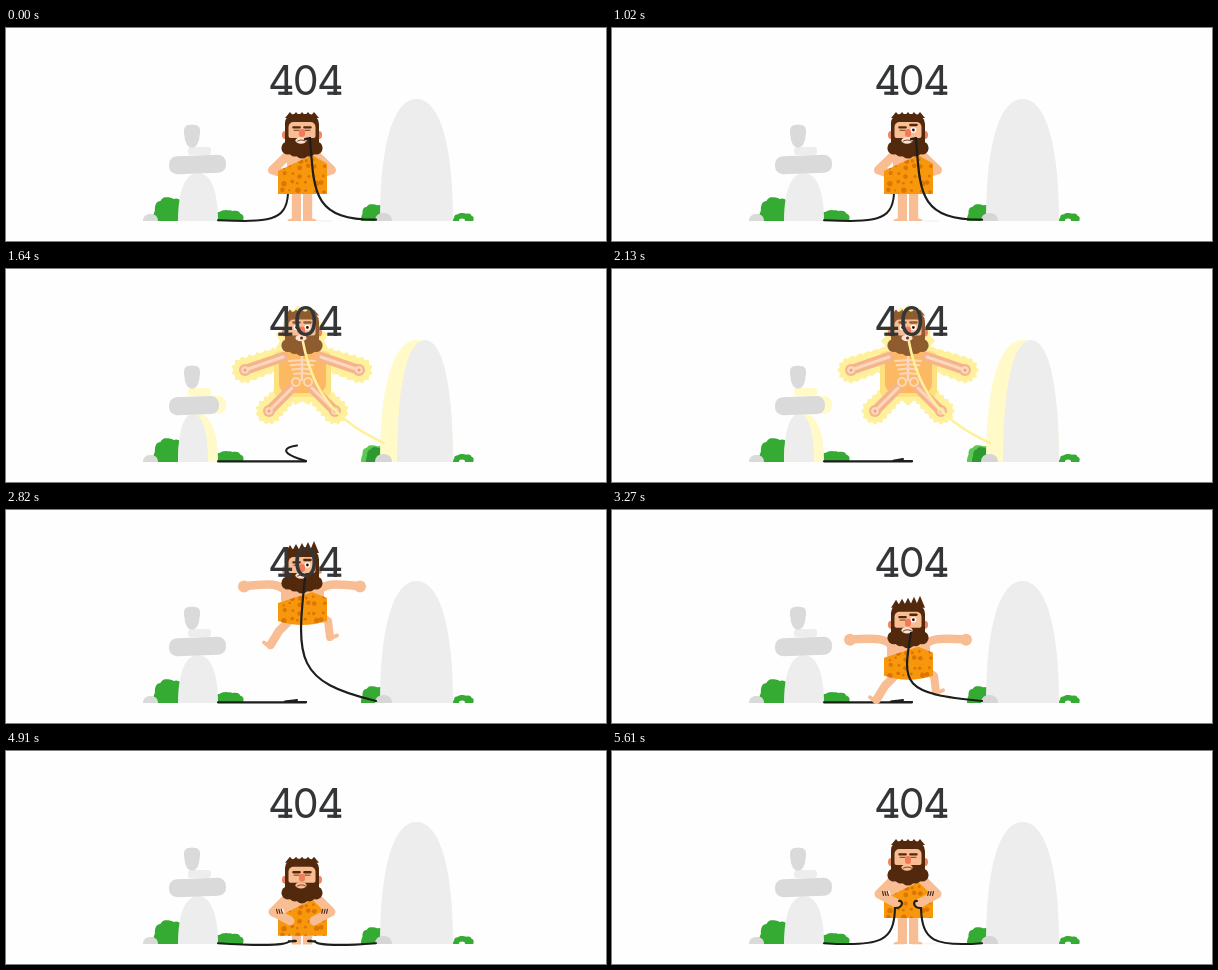
Write an HTML page with a canvas that moves like this. It is 600x213 px and loops after 5.72 s.

```html
<!DOCTYPE html>
<html lang="en">
<head>
<meta charset="utf-8">
<title>404</title>
<style>
html, body { margin: 0; width: 100%; height: 100%; overflow: hidden; background: #fefefe; }
canvas { display: block; width: 600px; height: 213px; }
</style>
</head>
<body>
<canvas id="stage"></canvas>
<script>
const W = 600, H = 213, LOOP = 5720, GROUND = 193, CX = 296;
const PAPER = '#fefefe', LIGHT = '#ededed', GREY = '#dadada', GREEN = '#36ab34';
const SKIN = '#f9bd94', HAIR = '#52290d', NOSE = '#f27a58', CLOTH = '#f7980c', SPOT = '#de7403';
const CORD = '#1d1d1b', GLOW = '#fff09b', LIT = '#fffac8', BONE = '#fbd8bd';
const SHOCK = 1130, DROP = 2680, LAND = 3390, SETTLED = 3780, STAND = 4740;

const canvas = document.getElementById('stage');
const ctx = canvas.getContext('2d');
const dpr = window.devicePixelRatio || 1;
canvas.width = W * dpr;
canvas.height = H * dpr;

const span = (t, a, b) => Math.max(0, Math.min(1, (t - a) / (b - a)));
const ease = k => k * k * (3 - 2 * k);
const mix = (a, b, k) => a + (b - a) * k;
function seeded(s) {
  return () => (s = s * 16807 % 2147483647) / 2147483647;
}

function oval(color, x, y, rx, ry = rx) {
  ctx.fillStyle = color;
  ctx.beginPath();
  ctx.ellipse(x, y, rx, ry, 0, 0, 7);
  ctx.fill();
}
function box(color, x, y, w, h, r = 0) {
  ctx.fillStyle = color;
  ctx.beginPath();
  ctx.roundRect(x, y, w, h, r);
  ctx.fill();
}
function limb(color, w, ...p) {
  ctx.strokeStyle = color;
  ctx.lineWidth = w;
  ctx.beginPath();
  for (let i = 0; i < p.length; i += 2) ctx.lineTo(p[i], p[i + 1]);
  ctx.stroke();
}
function curve(color, w, x, y, ...c) {
  ctx.strokeStyle = color;
  ctx.lineWidth = w;
  ctx.beginPath();
  ctx.moveTo(x, y);
  ctx.bezierCurveTo(...c);
  ctx.stroke();
}
// Closed shape from a radius rule
function radial(color, n, at) {
  ctx.fillStyle = color;
  ctx.beginPath();
  for (let i = 0; i < n; i++) ctx.lineTo(...at(i * 2 * Math.PI / n, i));
  ctx.fill();
}
function moved(x, y, draw) {
  ctx.save();
  ctx.translate(x, y);
  draw();
  ctx.restore();
}
// Draws both sides; x counts outward from the body axis
function bothSides(draw) {
  for (const s of [-1, 1]) moved(CX, 0, () => { ctx.scale(s, 1); draw(s); });
}

function dome(color, x0, x1, top) {
  const w = x1 - x0, k = GROUND - (GROUND - top) * 0.66;
  ctx.fillStyle = color;
  ctx.beginPath();
  ctx.moveTo(x0, GROUND);
  ctx.bezierCurveTo(x0, k, x0 + w * 0.2, top, x0 + w / 2, top);
  ctx.bezierCurveTo(x1 - w * 0.2, top, x1, k, x1, GROUND);
  ctx.fill();
}
function bush(color, x0, x1, h) {
  const r = (x1 - x0) / 2;
  radial(color, 90, a => {
    const q = 0.93 + 0.07 * Math.abs(Math.sin(a * 4.5));
    const flat = v => Math.sign(v) * Math.abs(v) ** 0.75;
    return [x0 + r + r * q * flat(Math.cos(a)), GROUND - h * q * Math.max(0, flat(Math.sin(a)))];
  });
}

function scenery(lit) {
  bush(GREEN, 147, 180, 24);
  bush(GREEN, 207, 238, 11);
  bush(lit ? '#5cc957' : GREEN, 355, 381, 17);
  if (lit) bush('#2d9a2f', 360, 381, 15);
  bush(GREEN, 447, 468, 8);
  oval(PAPER, 456, GROUND, 3, 2.4);
  dome(GREY, 137, 152, 186);

  box(lit ? LIT : LIGHT, 182, 119, 23, 8, 3);
  box(GREY, 178, 97, 16, 13, 5);
  oval(GREY, 186, 108, 7.5, 11.5);
  if (lit) dome(LIT, 172, 212, 145);
  dome(LIGHT, 172, lit ? 202 : 212, 145);
  moved(191.5, 136.5, () => {
    ctx.rotate(-0.035);
    if (lit) box(LIT, -28.5, -9, 57, 18, 8);
    box(GREY, -28.5, -9, lit ? 50 : 57, 18, 8);
  });

  if (lit) dome(LIT, 374, 447, 71);
  dome(LIGHT, lit ? 391 : 374, 447, 71);
  dome('#d6d6d6', 369, 386, 185);
  box(PAPER, 0, GROUND, W, 20);
}

function title() {
  ctx.fillStyle = '#333537';
  ctx.font = '400 41px Inter, Roboto, sans-serif';
  ctx.textAlign = 'center';
  [...'404'].forEach((c, i) => {
    const x = 275.3 + i * 24.5;
    ctx.fillText(c, x, 66.8);
    if (c === '4') ctx.fillRect(x - 3, 63.6, 14, 3.2);
  });
}

function eye(s, open, look, hair) {
  if (open) {
    oval('#fff', s * 5.4, -5, 3, 2.7);
    oval('#2a160c', s * 5.4 + look, -5, 1.4);
  } else {
    limb('#7b3c1d', 1, s * 2.8, -4.7, s * 8, -4.7);
  }
  const y = open ? -10 : -7.6;
  limb(hair, 2.3, s * 2.3, y, s * 8.6, y);
}

// Eyes counts the open ones
function head(y, { eyes = 0, mouth = 'frown', wild = 0, chew = 0, look = 0, hair = HAIR, skin = SKIN } = {}) {
  moved(CX, y, () => {
    for (const s of [-1, 1]) oval('#ec8663', s * 17, 0, 3, 4);
    box(hair, -17, -21, 34, 26, [9, 10, 3, 3]);
    for (let i = -2; i <= 2; i++) {
      const tip = -23 - wild * (4 + i);
      radial(hair, 3, (a, j) => [i * 6 + (j - 1) * 5, j === 1 ? tip : -17]);
    }
    moved(0, chew, () => {
      box(hair, -17, -2, 34, 17, 5);
      for (let i = -2; i <= 2; i++) oval(hair, i * 7, 17 - 2 * Math.abs(i), 6.6);
    });
    box(skin, -13.5, -13, 27, 16, [5, 5, 2, 2]);
    eye(-1, eyes > 1, look, hair);
    eye(1, eyes > 0, look, hair);
    moved(0, chew, () => {
      oval(mouth === 'frown' ? skin : '#fbe3d2', -1, 5.5, 5.6, 3.2);
      if (mouth === 'open') oval('#6b2d18', -0.5, 5.5, 1.5);
      else curve('#7b3c1d', 1, -5, 6.5, -3, 4.5, 2, 4.5, 4, 6.5);
    });
    box(NOSE, -3, -6, 6, 8, 3);
  });
}

function tunic(y, h, slant, r = 0) {
  const x = 272, w = 49, rnd = seeded(41);
  ctx.save();
  ctx.beginPath();
  ctx.moveTo(x, y + slant);
  ctx.lineTo(x + w * 0.7, y);
  ctx.lineTo(x + w, y + slant * 0.55);
  ctx.lineTo(x + w, y + h - r);
  ctx.quadraticCurveTo(x + w / 2, y + h + r, x, y + h - r);
  ctx.fillStyle = CLOTH;
  ctx.fill();
  ctx.clip();
  for (let dy = 3; dy < h; dy += 7.5)
    for (let dx = 3; dx < w; dx += 8)
      oval(SPOT, x + dx + rnd() * 4, y + dy + rnd() * 4, 1 + rnd() * 1.8);
  ctx.restore();
}

function legs() {
  box('#eeeeee', 282, 192.5, 44, 1);
  for (const s of [-1, 1]) {
    box(SKIN, CX + s * 5.6 - 4.6, 163, 9.2, 30);
    oval(SKIN, CX + s * 9.5, GROUND, 5, 2.5);
  }
  box(PAPER, 280, GROUND, 34, 4);
}

function tattoo(x, y) {
  for (let i = 0; i < 3; i++) limb('#4a2a16', 1.1, x - i * 2.4, y, x - 1 - i * 2.4, y + 4);
}

function biting(t) {
  const beat = t >= 30 && t < 800 ? Math.sin((t - 30) / 90) : 0;
  const bob = Math.abs(beat);
  curve(CORD, 2, 212, 192.3, 262, 194, 280, 194, 282, 166);
  legs();
  box(SKIN, 281, 121, 30, 30, 8);
  bothSides(() => limb(SKIN, 9, 14, 127, 29.5, 142, 20, 145));
  tunic(127, 39, 16);
  head(107 + bob * 0.6, { eyes: t >= 840 ? 1 : 0, mouth: 'bite', chew: bob * 1.2 });
  limb(CORD, 2.2, 299, 111, 304, 110);
  curve(CORD, 2.2, 304, 110, 308 + beat * 2, 165, 307 + beat * 2, 192, 370, 191.7);
}

function looseCord(t) {
  const k = t < 1640 ? 1 + (1640 - t) / 900 : 1 - ease(span(t, 1720, 2060));
  const w = Math.sin((t - 1640) / 70) * 2;
  limb(CORD, 2.2, 212, 192.3, 300, 192.3);
  curve(CORD, 2.1, 300, 192, 270 + w, mix(192, 183, k), 280 + w, mix(192, 178, k), 291, mix(190, 176.5, k));
}

function flying(t, dy) {
  const k = span(dy, 0, 94), swing = Math.sin(t / 110);
  const low = y => mix(y, 192, k);
  moved(0, dy, () => {
    limb(SKIN, 8.5, 282, 112, 273, 121, 264.5, 135);
    limb(SKIN, 4, 264, 137, 258, 132.5);
    limb(SKIN, 8, 315, 106, 322, 111, 324, 127);
    limb(SKIN, 4, 323, 129, 331, 125.5);
    box(SKIN, 275, 74, 43, 24, 8);
    bothSides(() => {
      curve(SKIN, 8.5, 15, 82, 24, 72, 34, 74, 56, 75.5 + swing);
      oval(SKIN, 58, 76 + swing, 6);
    });
    tunic(82, 33, 11, 4);
    head(60, { eyes: 1, mouth: 'bite', wild: 1 });
  });
  curve(CORD, 2.2, 299, 68 + dy, 290, low(150), 290, low(172), 370, 191);
}

function burst(x, y, r, turn) {
  radial(GLOW, 24, (a, i) => {
    const q = i % 2 ? r * 0.82 : r;
    return [x + q * Math.cos(a + turn), y + q * Math.sin(a + turn)];
  });
}

const LIMBS = [[19, 88, 57, 101], [10, 119, 33, 142]];
const eachLimb = draw => bothSides(() => LIMBS.forEach(b => draw(...b)));

function shocked(t) {
  const turn = Math.floor(t / 70) % 2 * 0.26;
  eachLimb((x, y, u, v) => {
    for (let k = 0; k <= 1; k += 0.2) burst(mix(x, u, k), mix(y, v, k), 12 + 2 * k, turn);
  });
  for (let y = 53; y <= 110; y += 19) burst(CX, y, y < 60 ? 17 : 27, turn);
  box('#fde07f', 268, 82, 57, 46, 6);
  box('#fcb862', 273, 82, 47, 42, 9);

  eachLimb((x, y, u, v) => {
    limb('#f5b48c', 10, x, y, u, v);
    oval('#f5b48c', u, v, 6);
    limb(BONE, 3, x, y, u, v);
    oval(BONE, u, v, 3.8);
    oval('#f0a17c', u, v, 1.5);
  });
  limb(BONE, 2.4, CX, 88, CX, 111);
  bothSides(() => {
    for (let i = 0; i < 4; i++) limb(BONE, 2, 0, 91 + i * 4.3, 13 - i * 1.7, 92 + i * 4.3);
    oval(BONE, 6, 113, 5);
    oval('#fcb862', 6, 113, 3);
  });
  head(63.5, { eyes: 2, mouth: 'open', hair: '#8f5c30', skin: '#f6bd96' });
  curve(GLOW, 2.6, 297, 73, 307, 125, 330, 152, 378, 174);
}

function sitting(t) {
  const k = span(t, LAND, SETTLED);
  const squash = Math.sin(k * 9) * (1 - k) * 0.09;
  const look = t < 4100 ? 0.8 : t < 4130 ? 0 : t < 4390 ? -0.9 : 0.4;
  limb(CORD, 2.2, 212, 192.3, 370, 191.7);
  moved(CX, GROUND, () => {
    ctx.scale(1 + squash, 1 - squash);
    ctx.translate(-CX, -GROUND);
    bothSides(() => limb(SKIN, 9, 18, 158, 30.5, 172, 14, 187));
    tunic(165, 21, 5);
    bothSides(() => {
      limb(SKIN, 9, 9, 178, 15, 189);
      oval(SKIN, 11, 189.5, 9, 4);
      curve('#e9a178', 0.9, 5, 191, 8, 186, 10, 186, 13, 190);
      limb(SKIN, 6, 29, 174, 17, 186);
      tattoo(25, 176);
    });
    head(147, { eyes: 2, mouth: 'open', look });
  });
}

function holding(t) {
  const dy = 36 * (1 - ease(span(t, STAND, 5080)));
  const grab = ease(span(t, 4850, 5230));
  const poke = Math.abs(Math.sin(span(t, 5300, 5610) * Math.PI * 2)) * 3;
  const up = y => mix(192.3, y + dy * 0.4, grab);
  ctx.save();
  ctx.beginPath();
  ctx.rect(0, 0, W, GROUND + 0.5);
  ctx.clip();
  ctx.translate(0, dy);
  legs();
  box(SKIN, 277, 124, 38, 24, 9);
  tunic(131, 36, 17);
  bothSides(() => {
    limb(SKIN, 9, 16, 130, 29, 143, 12, 152);
    tattoo(25.5, 140.5);
  });
  head(111);
  ctx.restore();
  bothSides(s => {
    curve(CORD, 2.1, s < 0 ? 84 : 74, 192.2, 26, 196, 14, up(190), 13, up(157));
    curve(CORD, 2.1, 13, up(157), 4 - poke, up(157), 5 - poke, up(149), 9 - poke, up(150));
    if (grab > 0.8) oval(SKIN, 11.5, 153 + dy, 3.2, 2.6);
  });
}

function draw(t) {
  ctx.setTransform(dpr, 0, 0, dpr, 0, 0);
  ctx.lineCap = ctx.lineJoin = 'round';
  box(PAPER, 0, 0, W, H);
  const lit = t >= SHOCK && t < DROP && (t - 1640 + 2450) % 245 < 175;
  const k = span(t, LAND, SETTLED);
  moved(0, -3 * (1 - k) * Math.abs(Math.sin(k * 6.3)), () => scenery(lit));
  if (t < SHOCK) biting(t);
  else if (t < LAND) {
    looseCord(t);
    if (lit) shocked(t);
    else flying(t, 39 * (Math.max(0, t - 2880) / 330) ** 2);
  } else if (t < STAND) sitting(t);
  else holding(t);
  title();
}

const start = performance.now();
function tick() {
  draw((performance.now() - start) % LOOP);
  requestAnimationFrame(tick);
}
tick();
</script>
</body>
</html>
```
